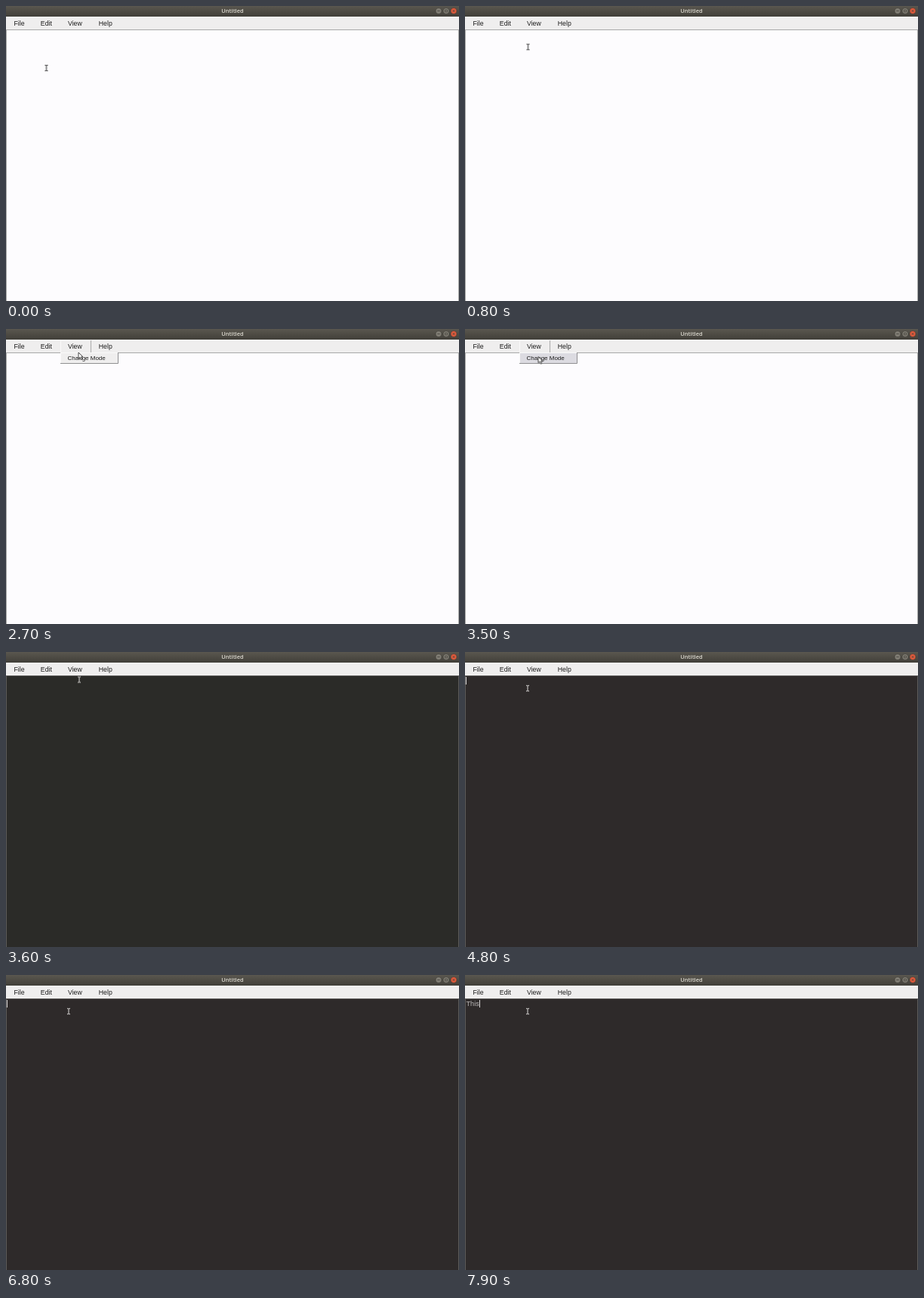
Write an HTML page that moves like this. It is 600 px wide and 390 px high and loops after 8000 ms.

```html
<!DOCTYPE html>
<html lang="en">
<head>
<meta charset="utf-8">
<title>Text editor</title>
<style>
  html, body { margin: 0; width: 100%; height: 100%; overflow: hidden; background: #fdfcfe; }
  svg { position: absolute; left: 0; top: 0; display: block; }
  text { font: 8.75px "Liberation Sans", Arial, sans-serif; fill: #1c1c1c; }
  .title { font: 600 7.5px "Open Sans", "Noto Sans", sans-serif; fill: #dedbd2; text-anchor: middle; }
  .item { font-size: 8px; }

  .page, .edge, .menu, .hover, .arrow, .beam, .line { animation: 8s step-end infinite; }
  .page { animation-name: page; }
  .edge { animation-name: edge; }
  .menu { animation-name: menu; }
  .hover { animation-name: hover; }
  .arrow { animation-name: arrow; }
  .beam { animation-name: beam; fill: none; }
  .pointer { animation: travel 8s linear infinite; }

  /* typed text, with the caret as its right border */
  .line {
    position: absolute; left: 1px; top: 33px; width: 0; height: 10px;
    overflow: hidden; white-space: pre; text-indent: .5px;
    font: 9.2px/10px "Liberation Sans", Arial, sans-serif; color: #b9b7b7;
    border-right: 1px solid transparent;
    animation-name: type, blink;
  }

  @keyframes page {
    0% { fill: #fdfcfe; }
    45% { fill: #2b2b28; }
    46.25%, 100% { fill: #2e2a2a; }
  }
  @keyframes edge {
    0% { fill: #a8a8a8; }
    45%, 100% { fill: #5c5a59; }
  }
  @keyframes menu {
    0% { opacity: 0; }
    21.25% { opacity: 1; }
    45%, 100% { opacity: 0; }
  }
  @keyframes hover {
    0% { opacity: 0; }
    37.5% { opacity: 1; }
    45%, 100% { opacity: 0; }
  }
  @keyframes arrow {
    0% { opacity: 0; }
    13.75% { opacity: 1; }
    45%, 100% { opacity: 0; }
  }
  @keyframes beam {
    0% { opacity: 1; stroke: #222; }
    13.75% { opacity: 0; }
    45%, 100% { opacity: 1; stroke: #e2e0de; }
  }
  /* the pointer moves ten times a second */
  @keyframes travel {
    0% { transform: translate(53.5px, 82px); animation-timing-function: steps(3); }
    3.75% { transform: translate(51px, 110px); animation-timing-function: steps(6); }
    11.25% { transform: translate(90px, 43px); animation-timing-function: steps(3); }
    15% { transform: translate(96px, 24px); }
    25% { transform: translate(96px, 24px); animation-timing-function: steps(7); }
    33.75% { transform: translate(96px, 31px); }
    36.25% { transform: translate(96px, 31px); animation-timing-function: steps(3); }
    40% { transform: translate(97px, 36.5px); }
    52.5% { transform: translate(97px, 36.5px); animation-timing-function: steps(4); }
    57.5%, 100% { transform: translate(83px, 48px); }
  }
  @keyframes type {
    0% { width: 0; }
    90% { width: 6.2px; }
    92.5% { width: 11.3px; }
    93.75% { width: 13.4px; }
    96.25%, 100% { width: 18.4px; }
  }
  @keyframes blink {
    0% { border-color: transparent; }
    57.5% { border-color: #d6d4d4; }
    65% { border-color: transparent; }
    68.75% { border-color: #d6d4d4; }
    76.25% { border-color: transparent; }
    80% { border-color: #d6d4d4; }
    87.5% { border-color: transparent; }
    90%, 100% { border-color: #d6d4d4; }
  }
</style>
</head>
<body>
<svg width="600" height="390" viewBox="0 0 600 390">
  <defs>
    <linearGradient id="bar" x2="0" y2="1">
      <stop offset="0" stop-color="#5a574f"/>
      <stop offset="1" stop-color="#413f39"/>
    </linearGradient>
  </defs>

  <rect class="page" y="31" width="600" height="359"/>
  <g class="edge">
    <rect y="31" width="600" height="1"/>
    <rect y="31" width="1" height="359"/>
    <rect x="599" y="31" width="1" height="359"/>
  </g>

  <rect width="600" height="14" fill="url(#bar)"/>
  <text class="title" x="300" y="9.2">Untitled</text>
  <g stroke="#3a3833" stroke-width=".6">
    <circle cx="573" cy="6.5" r="4" fill="#807d74"/>
    <circle cx="583" cy="6.5" r="4" fill="#807d74"/>
    <circle cx="593" cy="6.5" r="4" fill="#e35b3c"/>
  </g>
  <path d="M571.3 6.5h3.4M581.5 5.2h3v2.6h-3zM591.6 5.1l2.8 2.8m0-2.8l-2.8 2.8" fill="none" stroke="#45423c" stroke-width=".8"/>

  <rect y="14" width="600" height="17" fill="#efeeee"/>
  <g class="menu">
    <path d="M72.5 30V15.5H112" fill="none" stroke="#fafafa"/>
    <path d="M112.5 15v16" stroke="#aaa"/>
    <rect x="72" y="31" width="77" height="15" fill="#efeeee"/>
    <rect class="hover" x="73" y="32" width="75" height="13" fill="#dcdbe1"/>
    <path d="M72.5 45V31.5H148" fill="none" stroke="#f9f9f9"/>
    <path d="M72 45.5H148.5V31" fill="none" stroke="#8f8f91"/>
    <text class="item" x="81.5" y="41">Change Mode</text>
  </g>
  <text x="10.5" y="25.5">File</text>
  <text x="45.8" y="25.5">Edit</text>
  <text x="82" y="25.5">View</text>
  <text x="122.8" y="25.5">Help</text>

  <g class="pointer">
    <path class="arrow" d="M0 0V8.2L1.9 6.5L3.3 9.6L4.8 8.9L3.4 5.9H6Z" fill="#fff" stroke="#333" stroke-width=".9"/>
    <path class="beam" d="M-2 -3.7H-.5L0 -3.2L.5 -3.7H2M0 -3.2V3.2M-2 3.7H-.5L0 3.2L.5 3.7H2"/>
  </g>
</svg>
<div class="line">This</div>
</body>
</html>
```
